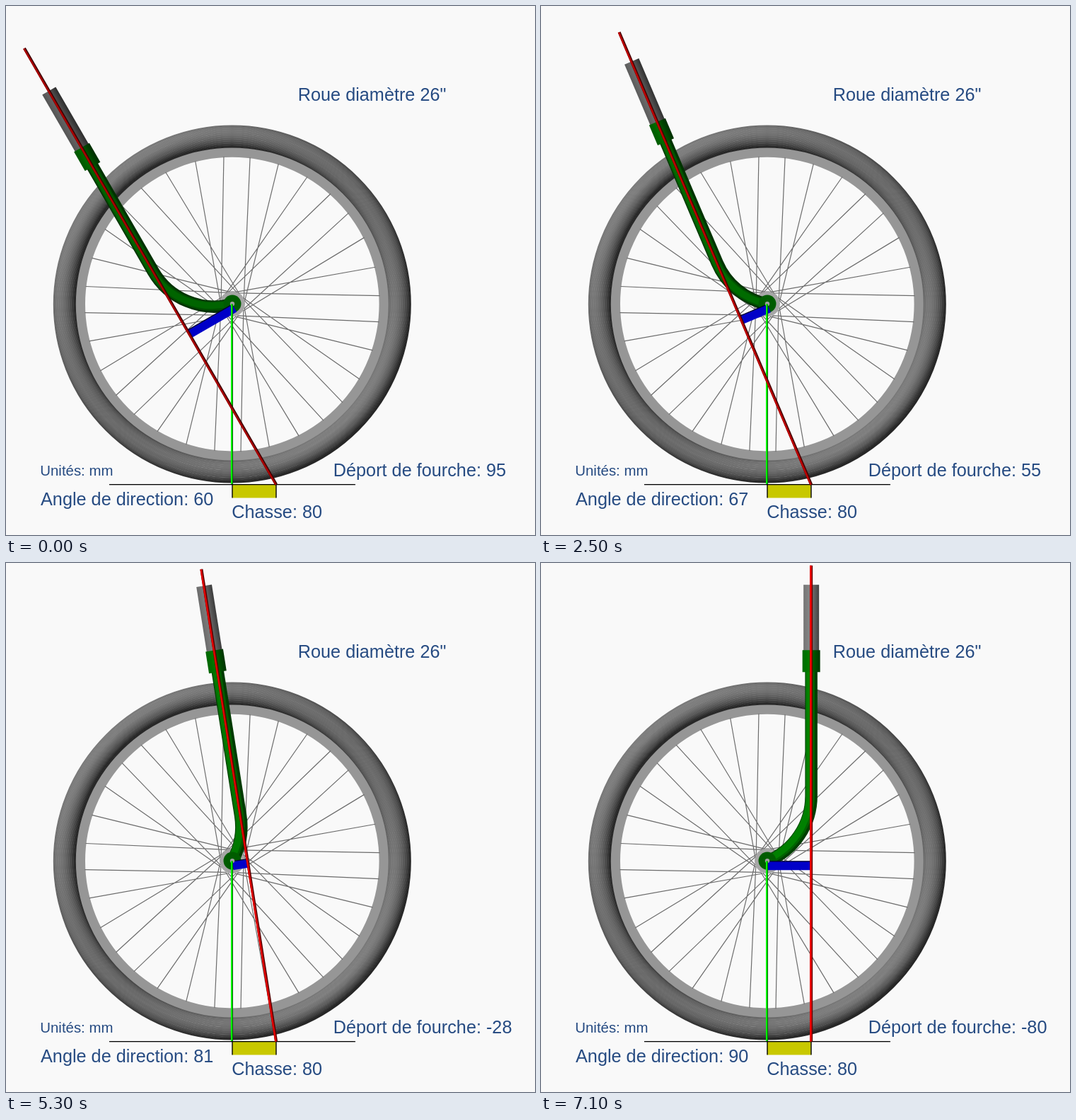
An HTML page with a canvas for the animation above (8 s loop, 748x748 px).

```html
<!DOCTYPE html>
<html lang="fr">
<head>
<meta charset="utf-8">
<style>
html, body { margin: 0; width: 100%; height: 100%; overflow: hidden; background: #f9f9f9; }
canvas { display: block; }
</style>
</head>
<body>
<canvas id="stage" width="748" height="748"></canvas>
<script>
const ctx = document.getElementById('stage').getContext('2d');
const CX = 320, CY = 421.6, GROUND = 676.6;
const RADIUS = 328, TRAIL = 80, SCALE = 0.777;   // mm, mm, px per mm
const BEND = 100;                                // radius of the curved fork end
const rad = deg => deg * Math.PI / 180;
const lerp = (a, b, k) => a + (b - a) * k;
const gray = v => `rgb(${v},${v},${v})`;
const green = v => `rgb(0,${v},0)`;

function box(x, y, w, h, fill) {
  ctx.fillStyle = fill;
  ctx.fillRect(x, y, w, h);
}

function disc(r, fill) {
  ctx.fillStyle = fill;
  ctx.beginPath();
  ctx.arc(CX, CY - 0.5, r, 0, 7);
  ctx.fill();
}

function ring(r, width, style) {
  ctx.strokeStyle = style;
  ctx.lineWidth = width;
  ctx.beginPath();
  ctx.arc(CX - 0.2, CY, r, 0, 7);
  ctx.stroke();
}

function text(str, x, y, size = 25.25) {
  ctx.font = `${size}px "Liberation Sans", Arial, sans-serif`;
  ctx.fillStyle = '#264b82';
  ctx.fillText(str, x, y);
}

// Fill running across a tube from its left to its right side
function across(half, colors) {
  const g = ctx.createLinearGradient(-half, 0, half, 0);
  colors.forEach((c, i) => g.addColorStop(i / (colors.length - 1), c));
  return g;
}

// Torus lit from the upper left, built of thin concentric rings
function tire() {
  for (let r = 222; r <= 252.5; r += 1.5) {
    const u = (r - 237.2) / 16, face = Math.sqrt(Math.max(0, 1 - u * u));
    const e = r * Math.SQRT1_2;
    const g = ctx.createLinearGradient(CX - e, CY - e, CX + e, CY + e);
    for (let i = 0; i <= 16; i++) {
      const v = 46 + 88 * (u * 0.66 * (1 - i / 8) + 0.68 * face);
      g.addColorStop(i / 16, gray(Math.max(38, Math.min(126, v))));
    }
    ring(r, 2, g);
  }
}

function spokes() {
  ctx.strokeStyle = '#6c6c6c';
  ctx.lineWidth = 1.2;
  ctx.beginPath();
  for (let turn = 0; turn < 360; turn += 45) {
    for (const [angle, lean] of [[-93.3, -58], [-83.1, 58], [-71.8, 58], [-59.5, -58]]) {
      const a = rad(angle + turn), b = rad(angle + turn + lean);
      ctx.moveTo(CX + 209 * Math.cos(a), CY + 209 * Math.sin(a));
      ctx.lineTo(CX + 18 * Math.cos(b), CY + 18 * Math.sin(b));
    }
  }
  ctx.stroke();
}

// Straight blade ending in an arc that meets the axle at sideways distance d
function blade(d, width, color) {
  const r = Math.sign(d) * BEND, h = Math.sqrt(2 * r * d - d * d);
  ctx.strokeStyle = color;
  ctx.lineWidth = width;
  ctx.beginPath();
  ctx.moveTo(0, -290);
  ctx.lineTo(0, -h);
  ctx.arc(r, -h, BEND, d > 0 ? Math.PI : 0, Math.atan2(h, d - r), d > 0);
  ctx.stroke();
}

function draw(deg) {
  const a = rad(deg), sin = Math.sin(a), cos = Math.cos(a);
  const offset = RADIUS * cos - TRAIL * sin;
  const d = offset * SCALE;
  const foot = (RADIUS * sin + TRAIL * cos) * SCALE;
  const k = (deg - 60) / 30;

  // Local frame: origin at the foot of the perpendicular, y down the steering axis
  function onAxis(paint, dx = 0, dy = 0) {
    ctx.save();
    ctx.translate(CX + TRAIL * SCALE - foot * cos + dx, GROUND - foot * sin + dy);
    ctx.rotate(a - Math.PI / 2);
    paint();
    ctx.restore();
  }

  box(0, 0, 748, 748, '#f9f9f9');
  ring(214.7, 13.8, '#969696');
  tire();
  disc(18, '#a6a6a6');
  spokes();

  onAxis(() => {
    box(-11, -391, 22, 94, across(11, [gray(lerp(84, 116, k)), gray(lerp(98, 132, k)),
      gray(lerp(72, 100, k)), gray(lerp(44, 66, k))]));
    blade(d, 17.5, green(lerp(48, 62, k)));
  });
  onAxis(() => blade(d, 13, green(lerp(78, 98, k))), -1.6, -0.8);
  onAxis(() => blade(d, 9, green(lerp(100, 128, k))), -2.6, -1.3);
  onAxis(() => box(-12.5, -298.5, 25, 31, across(12.5, [green(lerp(84, 108, k)),
    green(lerp(104, 122, k)), green(lerp(74, 84, k)), green(lerp(44, 54, k))])));

  disc(12.5, green(92));

  onAxis(() => {
    const x = Math.min(0, d), w = Math.abs(d);
    box(x, 0, w, 12.5, '#0000c8');
    box(x, -0.5, w, 1.3, '#000030');
  });

  disc(3.2, '#a0a0a0');
  box(318, CY, 3, GROUND - CY, '#006400');
  box(318, CY, 2, GROUND - CY, '#00ff00');

  box(320, 677, 62, 18.5, '#c8c800');
  box(146, 676, 348, 1.3, '#000');
  box(319.3, 677, 1.4, 18.5, '#000');
  box(381.3, 677, 1.4, 18.5, '#000');

  onAxis(() => {
    const len = 419 + 254 / sin;
    box(-2, foot - len, 4, len, `rgb(${lerp(60, 100, k)},0,0)`);
    box(-2, foot - len, 2.5, len, `rgb(${lerp(170, 250, k)},0,0)`);
  });

  text('Roue diamètre 26"', 412.8, 134);
  text('Unités: mm', 48.3, 663.5, 20.4);
  text('Angle de direction: ' + deg, 49, 706);
  text('Chasse: 80', 319.3, 724);
  text('Déport de fourche: ' + Math.round(offset), 462.8, 665);
}

const start = performance.now();
let shown = 0;
function tick() {
  const t = (performance.now() - start) % 8000;
  const deg = t < 1300 ? 60 : Math.min(90, 61 + Math.floor((t - 1300) / 200));
  if (deg !== shown) draw(shown = deg);
  requestAnimationFrame(tick);
}
tick();
</script>
</body>
</html>
```
